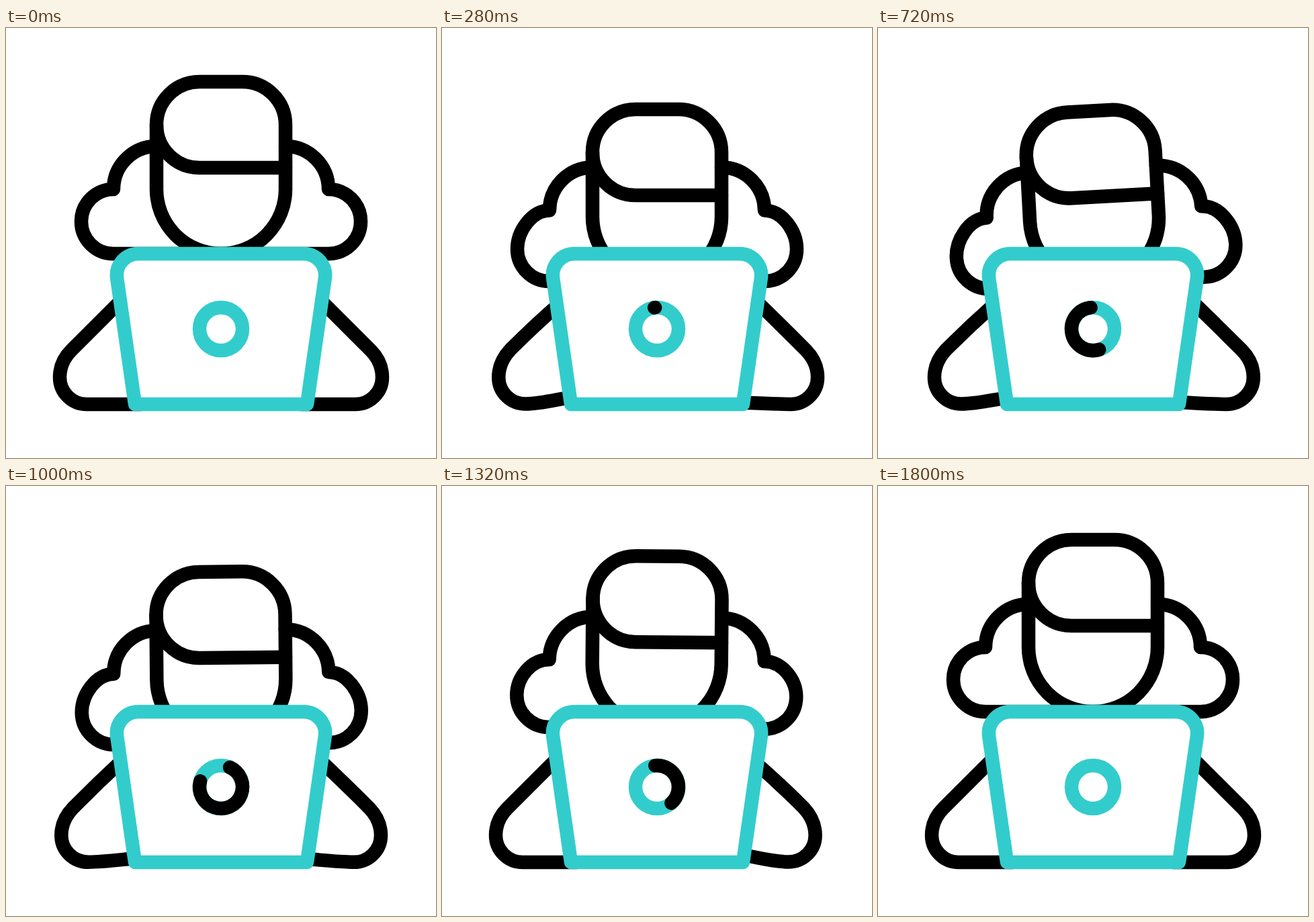
An HTML page for the animation above (2000 ms loop, 640x640 px).

```html
<!DOCTYPE html>
<html lang="en">
<head>
<meta charset="utf-8">
<title>Typing at a laptop</title>
<style>
  html, body { margin: 0; width: 100%; height: 100%; overflow: hidden; background: #fff; }
  svg { display: block; width: 100%; height: 100%; }
  path, circle { fill: none; stroke: #000; stroke-width: 20.5; stroke-linecap: round; stroke-linejoin: round; }
  .teal { stroke: #33cccc; }
  .screen { fill: #fff; }
</style>
</head>
<body>
<svg viewBox="0 0 640 640">
  <path id="left"/>
  <path id="right" transform="translate(640 0) scale(-1 1)"/>
  <g id="bust">
    <path id="hair"/>
    <g id="head">
      <path d="M224 144A64 64 0 0 1 288 80H352A64 64 0 0 1 416 144V240A96 96 0 0 1 224 240Z"/>
      <path d="M224 144A64 64 0 0 0 288 208H416"/>
    </g>
  </g>
  <path class="teal screen" d="M192 560L165.2 372.6A32 32 0 0 1 196.9 336H443.1A32 32 0 0 1 474.8 372.6L448 560Z"/>
  <circle class="teal" cx="320" cy="448" r="32"/>
  <path id="spin"/>
</svg>
<script>
const LOOP = 2000, STEP = 40;
const $ = id => document.getElementById(id);
const set = (id, name, value) => $(id).setAttribute(name, value);

// Tables of [step, value]; eased between neighbours.
const DROP = [[1, 0], [7, 41], [15, 41], [23, 49], [43, 0]];
const SQUASH = [[1, 0], [7, 9.6], [23, 9.6], [43, 0]];
const TILT = [[12, 0], [19, -3.3], [29.8, 1.5], [35, 0]];
const ARC_HEAD = [[6, 5], [29, 365]];
const ARC_TAIL = [[17.2, 5], [45, 365]];

function ease(keys, n) {
  if (n <= keys[0][0]) return keys[0][1];
  for (let i = 1; i < keys.length; i++) {
    const [a, from] = keys[i - 1], [b, to] = keys[i];
    if (n < b) {
      const u = (n - a) / (b - a);
      return from + (to - from) * u * u * (3 - 2 * u);
    }
  }
  return keys[keys.length - 1][1];
}

// Linear back-and-forth between a start and an end step.
function tap(n, start, period, end) {
  if (n <= start || n >= end) return 0;
  const p = (n - start) / period % 1;
  return 4.7 * (1 - Math.abs(2 * p - 1));
}

function arm(e) {
  const x = 97.4 + e, y = 479.6 - 0.2 * e;
  return `M177 ${400 + 2 * e}C151 ${426 + 1.2 * e} ${x + 26} ${y - 26} ${x} ${y}` +
    `C${86 + e} 491 ${80 + e} 505 ${80 + e} 520` +
    `C${80 + e} 542 ${98 + e} ${560 - 0.1 * e} ${120 + e} ${560 - 0.1 * e}` +
    `C${145 + e} ${560 - 0.2 * e} 170 ${560 - 1.7 * e} 200 ${560 - 2.8 * e}`;
}

function curls(top, low) {
  const side = f =>
    `M${f(224)} ${176 + top}C${f(188.7)} ${176 + top} ${f(160)} ${204.7 + top} ${f(160)} ${240 + top}` +
    `C${f(133.5)} ${240 + top} ${f(112)} ${261.5 + low} ${f(112)} ${288 + low}` +
    `C${f(112)} ${314.5 + low} ${f(133.5)} ${336 + low} ${f(160)} ${336 + low}H320`;
  return side(x => x) + side(x => 640 - x);
}

function arc(tail, head) {
  if (head - tail < 0.01) return "";
  const at = deg => {
    const a = deg * Math.PI / 180;
    return `${320 - 32 * Math.sin(a)} ${448 - 32 * Math.cos(a)}`;
  };
  return `M${at(tail)}A32 32 0 ${head - tail > 180 ? 1 : 0} 0 ${at(head)}`;
}

function draw(n) {
  const drop = ease(DROP, n);
  set("head", "transform", `translate(0 ${drop})`);
  set("hair", "d", curls(drop - ease(SQUASH, n), drop));
  set("bust", "transform", `rotate(${ease(TILT, n)} 320 ${204 + drop})`);
  set("left", "d", arm(tap(n, 1.2, 10.6, 43)));
  set("right", "d", arm(tap(n, 5.9, 10.7, 38)));
  set("spin", "d", arc(ease(ARC_TAIL, n), ease(ARC_HEAD, n)));
}

const begin = performance.now();
function tick() {
  draw(Math.floor((performance.now() - begin) % LOOP / STEP));
  requestAnimationFrame(tick);
}
tick();
</script>
</body>
</html>
```
